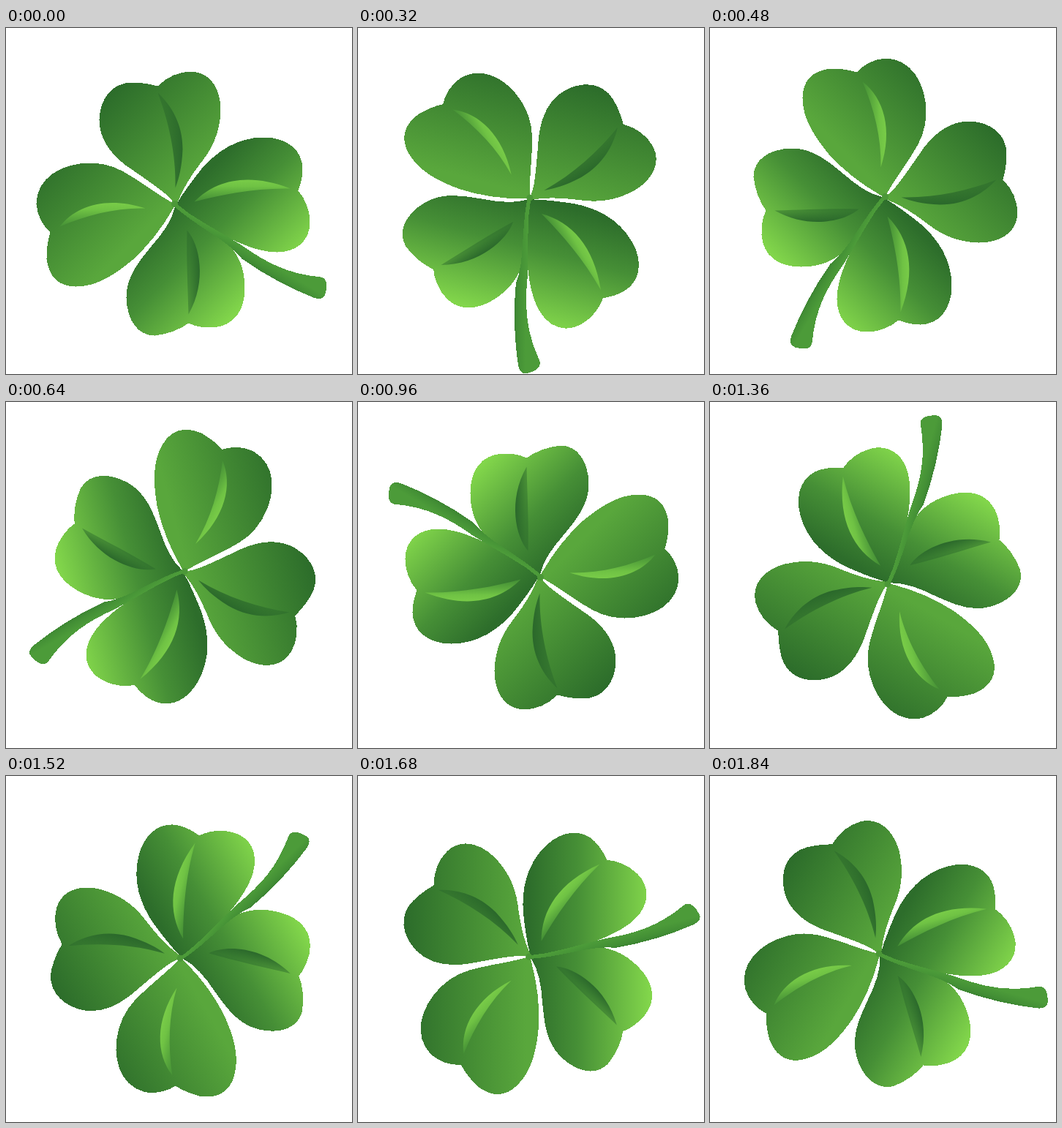
An HTML page that plays this animation: 473x473 px, repeating every 1.92 s.

```html
<!DOCTYPE html>
<html lang="en">
<head>
<meta charset="utf-8">
<title>Spinning clover</title>
<style>
  html, body { margin: 0; width: 100%; height: 100%; overflow: hidden; background: #fff; }
  svg { display: block; width: 100%; height: 100%; }
  .edge { shape-rendering: crispEdges; }
</style>
</head>
<body>
<svg viewBox="0 0 473 473">
  <defs>
    <linearGradient id="upper" gradientUnits="userSpaceOnUse" x1="112" y1="112" x2="232" y2="232">
      <stop stop-color="#2b6b2a"/><stop offset="1" stop-color="#59a73c"/>
    </linearGradient>
    <linearGradient id="lower" gradientUnits="userSpaceOnUse" x1="235" y1="235" x2="352" y2="352">
      <stop stop-color="#2d6d2b"/><stop offset=".4" stop-color="#468f36"/><stop offset="1" stop-color="#82d64b"/>
    </linearGradient>
    <linearGradient id="stem" gradientUnits="userSpaceOnUse" x1="349" y1="314" x2="337" y2="334">
      <stop stop-color="#4c9b39"/><stop offset=".45" stop-color="#438f35"/><stop offset="1" stop-color="#31752d"/>
    </linearGradient>
    <!-- Vein shading is strongest on the bulging edge -->
    <linearGradient id="dark">
      <stop offset=".2" stop-color="#28652a" stop-opacity=".45"/><stop offset="1" stop-color="#28652a" stop-opacity=".95"/>
    </linearGradient>
    <linearGradient id="light" x2="0" y2="1">
      <stop stop-color="#79cc48"/><stop offset=".3" stop-color="#6fc244"/><stop offset="1" stop-color="#479437" stop-opacity=".75"/>
    </linearGradient>
  </defs>
  <g id="clover">
    <g class="edge" fill="url(#upper)">
      <path d="M227 236C218 224 190 206 163 187C141 170 127 150 127 125C128 95 145 74 172 74C187 74 199 77 207 79C220 66 236 59 253 59C280 60 293 84 293 112C292 145 280 166 265 185C253 201 242 217 234 238Z"/>
      <path d="M231 241C205 226 190 214 172 203C155 192 138 184 115 184C75 184 41 205 41 240C42 256 50 270 60 279C56 290 55 305 55 315C58 340 72 353 95 353C125 353 150 335 172 317C194 297 212 274 227 248Z"/>
    </g>
    <g class="edge" fill="url(#lower)">
      <path d="M232 241C244 221 256 206 267 192C287 169 315 149 352 149C385 149 405 168 405 192C405 205 402 213 399 222C408 232 415 248 415 265C415 290 397 306 370 306C345 306 315 293 285 277C265 266 248 252 232 241Z"/>
      <path d="M231 242C227 262 214 280 199 297C182 318 164 338 164 368C165 400 180 420 203 420C222 418 238 411 249 403C259 408 270 409 282 409C312 407 326 385 326 355C326 325 315 305 298 289C280 272 250 260 231 242Z"/>
    </g>
    <path class="edge" fill="url(#stem)" d="M229 237C255 260 290 276 324 298C355 320 385 336 430 340C438 341 440 350 436 363C434 370 428 371 420 368C389 356 353 337 322 315C303 290 262 272 230 244Z"/>
    <circle cx="230" cy="240" r="4.5" fill="#4c9838"/>
    <g fill="url(#dark)">
      <path d="M207 88C225 105 241 130 241 165C240 190 236 205 231 218C232 172 222 128 207 88Z"/>
      <path d="M247 276C264 295 275 345 249 391C248 350 246 315 247 276Z"/>
    </g>
    <g fill="url(#light)">
      <path d="M73 271C95 242 138 229 190 246C150 245 110 255 73 271Z"/>
      <path d="M257 237C287 207 331 197 388 219C340 218 295 227 257 237Z"/>
    </g>
  </g>
</svg>
<script>
  const STEP_MS = 80, STEPS = 24;
  const clover = document.getElementById("clover");

  function draw() {
    const step = Math.floor(performance.now() / STEP_MS) % STEPS;
    clover.setAttribute("transform", `rotate(${step * 360 / STEPS} 240 240) translate(.5 .5)`);
    requestAnimationFrame(draw);
  }
  draw();
</script>
</body>
</html>
```
